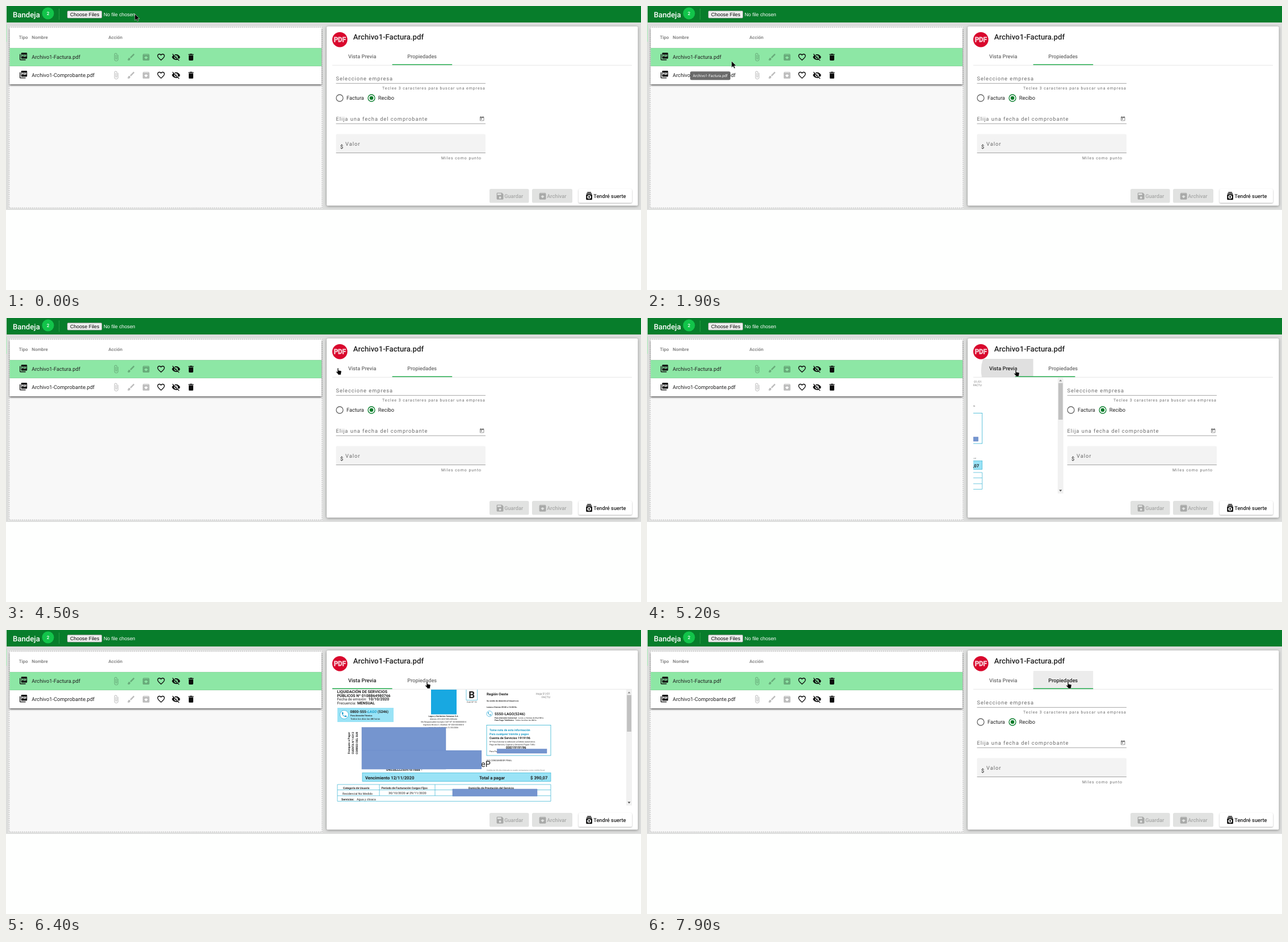
Recreate the animation shown at these times as an HTML page. Size 1119 px wide and 500 px high, loop 8000 ms.

```html
<!DOCTYPE html>
<html lang="es">
<head>
<meta charset="utf-8">
<title>Bandeja</title>
<style>
  html, body { margin: 0; width: 100%; height: 100%; overflow: hidden; background: #fefffe; }
  svg { display: block; width: 100%; height: 100%; }
  text { font-family: Roboto, sans-serif; text-rendering: geometricPrecision; white-space: pre; }
  .native { font-family: "Liberation Sans", Arial, sans-serif; }
  .field text { letter-spacing: .98px; }
  .table { filter: drop-shadow(0 2.2px 1.8px rgba(0,0,0,.65)); }
  .card { filter: drop-shadow(0 1.5px 2px rgba(0,0,0,.4)); }
  .raised { filter: drop-shadow(0 1px 1px rgba(0,0,0,.3)); }
</style>
</head>
<body>
<svg id="stage" viewBox="0 0 1119 500" preserveAspectRatio="xMinYMin meet"></svg>
<script>
const LOOP = 8000, STEP = 100;
const INK = '#212121', MUTED = 'rgba(0,0,0,.54)', OFF = 'rgba(0,0,0,.26)';
const GREEN = '#077d2b', CYAN = '#9ae3f6', MASK = '#7595cf', EDGE = '#35b4d3';

const ICONS = {
  pdf: 'M20 2H8c-1.1 0-2 .9-2 2v12c0 1.1.9 2 2 2h12c1.1 0 2-.9 2-2V4c0-1.1-.9-2-2-2zm-8.5 7.5c0 .83-.67 1.5-1.5 1.5H9v2H7.5V7H10c.83 0 1.5.67 1.5 1.5v1zm5 2c0 .83-.67 1.5-1.5 1.5h-2.5V7H15c.83 0 1.5.67 1.5 1.5v3zm4-3H19v1h1.5V11H19v2h-1.5V7h3v1.5zM9 9.5h1v-1H9v1zM4 6H2v14c0 1.1.9 2 2 2h14v-2H4V6zm10 5.5h1v-3h-1v3z',
  clip: 'M16.5 6v11.5c0 2.2-1.8 4-4 4s-4-1.8-4-4V5c0-1.4 1.1-2.5 2.5-2.5s2.5 1.1 2.5 2.5v10.5c0 .6-.4 1-1 1s-1-.4-1-1V6H10v9.5c0 1.4 1.1 2.5 2.5 2.5s2.5-1.1 2.5-2.5V5c0-2.2-1.8-4-4-4S7 2.8 7 5v12.5c0 3 2.5 5.5 5.5 5.5s5.5-2.5 5.5-5.5V6z',
  brush: 'M7 14c-1.7 0-3 1.3-3 3 0 1.3-1.2 2-2 2 .9 1.2 2.5 2 4 2 2.2 0 4-1.8 4-4 0-1.7-1.3-3-3-3zM20.7 4.6l-1.3-1.3c-.4-.4-1-.4-1.4 0L9 12.25 11.75 15l9-9c.4-.4.4-1 0-1.4z',
  archive: 'M20.5 5.2l-1.4-1.7C18.9 3.2 18.5 3 18 3H6c-.5 0-.9.2-1.2.5L3.5 5.2C3.2 5.6 3 6 3 6.5V19c0 1.1.9 2 2 2h14c1.1 0 2-.9 2-2V6.5c0-.5-.2-.9-.5-1.3zM12 17.5L6.5 12H10v-2h4v2h3.5zM5.1 5l.8-1h12l.9 1z',
  heart: 'M12 21.3L10.5 20C5.4 15.4 2 12.3 2 8.5 2 5.4 4.4 3 7.5 3c1.7 0 3.4.8 4.5 2.1C13.1 3.8 14.8 3 16.5 3 19.6 3 22 5.4 22 8.5c0 3.8-3.4 6.9-8.5 11.5zM12 18.6c4.8-4.3 8-7.2 8-10.1C20 6.5 18.5 5 16.5 5c-1.5 0-3 1-3.6 2.4h-1.8C10.5 6 9 5 7.5 5 5.5 5 4 6.5 4 8.5c0 2.9 3.2 5.8 8 10.1z',
  hidden: 'M12 7c2.76 0 5 2.24 5 5 0 .65-.13 1.26-.36 1.83l2.92 2.92c1.51-1.26 2.7-2.89 3.43-4.75-1.73-4.39-6-7.5-11-7.5-1.4 0-2.74.25-3.98.7l2.16 2.16C10.74 7.13 11.35 7 12 7zM2 4.27l2.74 2.74C3.08 8.3 1.78 10.02 1 12c1.73 4.39 6 7.5 11 7.5 1.55 0 3.03-.3 4.38-.84L19.73 22 21 20.73 3.27 3zM7.53 9.8l1.55 1.55c-.05.21-.08.43-.08.65 0 1.66 1.34 3 3 3 .22 0 .44-.03.65-.08l1.55 1.55c-.67.33-1.41.53-2.2.53-2.76 0-5-2.24-5-5 0-.79.2-1.53.53-2.2zm4.31-.78l3.15 3.15.02-.16c0-1.66-1.34-3-3-3z',
  bin: 'M6 19c0 1.1.9 2 2 2h8c1.1 0 2-.9 2-2V7H6zM19 4h-3.5l-1-1h-5l-1 1H5v2h14z',
  save: 'M17 3H5c-1.1 0-2 .9-2 2v14c0 1.1.9 2 2 2h14c1.1 0 2-.9 2-2V7zM12 19a3 3 0 0 1 0-6 3 3 0 0 1 0 6zM15 9H5V5h10z',
  day: 'M19 3h-1V1h-2v2H8V1H6v2H5c-1.1 0-2 .9-2 2v14c0 1.1.9 2 2 2h14c1.1 0 2-.9 2-2V5c0-1.1-.9-2-2-2zM19 19H5V8h14zM7 10h5v5H7z',
  luck: 'M7 1h10v2H7zM5 4h14v2H5zM6 7h12a2 2 0 0 1 2 2v11a2 2 0 0 1-2 2H6a2 2 0 0 1-2-2V9a2 2 0 0 1 2-2zM12 9.5a5 5 0 0 0 0 10 5 5 0 0 0 0-10zM12 11l-3 3.5h2V18h2v-3.5h2z',
  phone: 'M6.6 10.8c1.4 2.8 3.8 5.1 6.6 6.6l2.2-2.2c.3-.3.7-.4 1-.2 1.1.4 2.3.6 3.6.6.5 0 1 .4 1 1V20c0 .5-.5 1-1 1C10.6 21 3 13.4 3 4c0-.5.5-1 1-1h3.5c.5 0 1 .5 1 1 0 1.3.2 2.5.6 3.6.1.3 0 .7-.3 1z'
};

const text = (x, y, size, str, o = {}) =>
  `<text x="${x}" y="${y}" font-size="${size}" font-weight="${o.w || 400}" fill="${o.c || INK}" ` +
  `text-anchor="${o.a || 'start'}" ${o.x || ''}>${str}</text>`;
const bold = (x, y, size, str, o = {}) => text(x, y, size, str, { w: 700, ...o });
const rect = (x, y, x2, y2, fill, extra = '') =>
  `<rect x="${x}" y="${y}" width="${x2 - x}" height="${y2 - y}" fill="${fill}" ${extra}/>`;
const line = (d, stroke, width = .7, extra = '') =>
  `<path d="${d}" fill="none" stroke="${stroke}" stroke-width="${width}" ${extra}/>`;
const icon = (name, cx, cy, fill, size = 15.84) =>
  `<path d="${ICONS[name]}" fill="${fill}" fill-rule="evenodd" ` +
  `transform="translate(${cx - size / 2} ${cy - size / 2}) scale(${size / 24})"/>`;

function header() {
  return rect(1, 0, 1119, 29, GREEN) +
    text(12, 19.5, 13.2, 'Bandeja', { w: 500, c: '#fff' }) +
    '<circle cx="74" cy="13" r="10.5" fill="#12c44a"/>' +
    text(74, 16, 8, '2', { w: 500, c: '#fff', a: 'middle' }) +
    line('M93.7 5V24', '#45c463', 1, 'stroke-dasharray="1.3 1.3"') +
    rect(108, 8.6, 169, 21.3, '#efefef', 'rx="1.5" stroke="#767676" stroke-width=".6"') +
    text(113, 18.2, 8.8, 'Choose Files', { c: '#000', x: 'class="native"' }) +
    text(172, 18, 8.8, 'No file chosen', { c: '#fff', x: 'class="native"' });
}

function fileRow(y, name) {
  const tools = ['clip', 'brush', 'archive', 'heart', 'hidden', 'bin'];
  return icon('pdf', 30.6, y + 14.8, '#111') + text(45.3, y + 19.2, 9.24, name) +
    tools.map((n, i) => icon(n, 194 + 26.4 * i, y + 16, i < 3 ? OFF : '#0c0c0c')).join('');
}

function filePanel() {
  const head = { w: 500, c: MUTED };
  return rect(4.5, 36, 558, 356.5, '#f8f8f8') +
    rect(5.5, 37.3, 557, 355.5, 'none', 'stroke="#c6c6c6" stroke-width="1.6" stroke-dasharray="2 1.6"') +
    `<g class="table">${rect(6.5, 38.3, 556, 137.7, '#fff')}</g>` +
    rect(6.5, 74, 556, 106, '#8de7a5', 'id="row1"') + rect(6.5, 106, 556, 137.7, '#fff', 'id="row2"') +
    line('M6.5 74H556M6.5 105.8H556', 'rgba(0,0,0,.14)') +
    text(22.8, 58, 7.92, 'Tipo', head) + text(45.3, 58, 7.92, 'Nombre', head) + text(180.6, 58, 7.92, 'Acción', head) +
    fileRow(74, 'Archivo1-Factura.pdf') + fileRow(105.8, 'Archivo1-Comprobante.pdf');
}

function button(x, x2, name, label, on) {
  return `<g class="${on ? 'raised' : ''}">${rect(x, 322, x2, 346.5, on ? '#fff' : '#e1e2e1', 'rx="2.6"')}</g>` +
    icon(name, x + 18.6, 334.7, on ? '#000' : '#a8a9a8') +
    text(x + 26.2, 338, 9.24, label, { w: 500, c: on ? INK : '#a8a9a8' });
}

function form() {
  const label = 'rgba(0,0,0,.58)', rule = 'rgba(0,0,0,.45)';
  const radio = (cx, c) => `<circle cx="${cx}" cy="162" r="6" fill="none" stroke="${c}" stroke-width="1.3"/>`;
  return '<g class="field">' + text(581.5, 131.3, 9.24, 'Seleccione empresa', { c: label }) +
    text(663, 147.2, 6.93, 'Teclee 3 caracteres para buscar una empresa', { c: label }) +
    text(581.5, 201.8, 9.24, 'Elija una fecha del comprobante', { c: label }) +
    rect(581.5, 225.5, 845, 258.8, '#f3f3f3', 'rx="2"') +
    text(589, 250.5, 9.24, '$') + text(598, 246, 9.24, 'Valor', { c: label }) +
    text(767, 269.6, 6.93, 'Miles como punto', { c: label }) + '</g>' +
    line('M581.5 136.3H845M581.5 207.2H845M581.5 258.6H845', rule, .8) +
    icon('day', 838.7, 198.6, MUTED, 9.8) +
    radio(588, 'rgba(0,0,0,.6)') + text(600, 165.3, 9.24, 'Factura') +
    radio(644, GREEN) + `<circle cx="644" cy="162" r="3.3" fill="${GREEN}"/>` + text(655.8, 165.3, 9.24, 'Recibo');
}

function bill() {
  const blue = { c: '#1799c6' }, gray = { c: '#777' }, mid = { a: 'middle' };
  const phone = (x, y, r) => `<circle cx="${x}" cy="${y}" r="${r}" fill="#fff" stroke="#2aa9d6" stroke-width=".7"/>` +
    icon('phone', x, y, '#1c9fd0', r * 1.5);
  const side = (x, s) => text(0, 0, 4.9, s, { w: 700, a: 'middle', x: `transform="translate(${x} 199) rotate(-90)"` });
  const mask = (x, y, x2, y2) => rect(x, y, x2, y2, MASK, 'stroke="#5d7fc0" stroke-width=".5"');
  return bold(583.5, 110.8, 6.9, 'LIQUIDACIÓN DE SERVICIOS') +
    bold(583.5, 117.6, 6.75, 'PÚBLICOS Nº 0108B64980766') +
    text(583.5, 124.3, 6.5, 'Fecha de emisión:') + bold(638.5, 124.3, 6.9, '10/10/2020') +
    text(583.5, 131, 6.5, 'Frecuencia:') + bold(619, 131, 6.7, 'MENSUAL') +
    rect(584, 137, 683, 162, CYAN) + phone(596, 149, 7.5) +
    bold(606.5, 146, 6.4, '0800-555-<tspan fill="#1799c6" font-style="italic">LAGO</tspan> (5246)') +
    bold(607, 152, 3.8, 'Para Atención Técnica') +
    text(607, 158, 4.3, 'Todos los días las <tspan font-weight="700">24</tspan> horas') +
    rect(749, 100, 794, 148.5, '#18a8e1') +
    bold(771, 153.2, 3.6, 'Lagos y Vertientes Serranas S.A.', mid) +
    text(771, 158.2, 3.6, 'Alerces 418 (X2210KLD)Norte', mid) +
    text(771, 163, 3.6, 'IVA Responsable Inscripto CUIT Nº 30-00000000-0', mid) +
    text(771, 168, 3.6, 'Ingresos Brutos C. Multilat. Nº 000-000000-0', mid) +
    text(771, 173, 3.6, 'Inicio de actividades 21/03/2006', mid) +
    line('M811 100V123.5H830.5V100', EDGE) + bold(820.8, 120.2, 17, 'B', mid) +
    text(820.8, 127.8, 3.6, 'Cod. Nº 10', mid) +
    bold(847, 115, 6.3, 'Región Oeste') +
    text(934, 114, 5, 'Hoja 01/01', gray) + text(944, 119.6, 5, 'FACTU', gray) +
    bold(847, 126, 3.5, 'Su centro de Atención al Usuario es:') +
    bold(847, 137, 3.5, 'Lunes a Viernes 09:00 a 16:00 Hs.') +
    phone(852, 147.5, 5) + bold(861, 150.2, 6.5, '5550-LAGO(5246)') +
    bold(861, 155.8, 3.5, 'Para Atención Comercial <tspan font-weight="400">- Lunes a Viernes de</tspan> 8 a 18 <tspan font-weight="400">hs</tspan>') +
    bold(861, 160.4, 3.5, 'Para Pago Telefónico <tspan font-weight="400">- Todos los días las</tspan> 24 <tspan font-weight="400">hs</tspan>') +
    rect(847, 167.5, 960, 221, '#fff', `stroke="${EDGE}" stroke-width=".8"`) +
    bold(852, 178, 5.15, 'Tome nota de esta información', blue) +
    bold(852, 184.6, 5.05, 'Para cualquier trámite y pagos', blue) +
    bold(852, 191.7, 5.45, 'Cuenta de Servicios 1919196') +
    text(852, 198, 3.6, 'Nº Para Solicitar la Adhesión al Débito Automático.') +
    text(852, 203.2, 3.7, 'Pago en Bancos, Cajeros y Servicios Pagos TARJ.') +
    bold(881, 208.6, 6.2, '0001919196') + text(852, 215, 3.7, 'Para Pago') + mask(865.5, 209.5, 953, 217) +
    side(606, 'Franqueo a Pagar') + side(612.8, 'CUENTA N°14313') + side(619.5, 'CORREO DEL SUR') +
    bold(670, 248.2, 6.1, '0403822250978T688 -') + text(837, 241.2, 14.5, 'eP') +
    mask(627, 171.5, 775, 245) + rect(627, 212, 838, 245, MASK) +
    line('M627 212H838V245', '#5d7fc0', .5, 'stroke-dasharray="1 1"') +
    text(847, 230.6, 4, 'IVA CONSUMIDOR FINAL') +
    text(847, 248.2, 3.3, 'Crédito de IVA discriminado no puede computarse como crédito fiscal', gray) +
    rect(628, 251.5, 960, 266.5, CYAN, `stroke="${EDGE}" stroke-width=".7"`) +
    bold(633, 262.7, 7.7, 'Vencimiento 12/11/2020') + bold(834, 262.7, 7.75, 'Total a pagar') + bold(924, 262.7, 7.75, '$ 390,07') +
    line('M584 272H960V301.5H584ZM584 281.5H960M584 291.8H960M658 272V291.8M756 272V291.8', EDGE) +
    bold(594, 279.7, 4.95, 'Categoría de Usuario') + bold(661.5, 279.7, 5, 'Período de Facturación Cargos Fijos') +
    bold(815, 279.7, 4.95, 'Domicilio de Prestación del Servicio') +
    text(593, 289.5, 5.2, 'Residencial No Medido') + text(674, 289, 5.6, '30/10/2020 al 29/11/2020') +
    mask(787, 280, 936, 292.5) + bold(591, 299.6, 5.1, 'Servicios:') + text(618, 299.6, 5.4, 'Agua y cloaca') +
    rect(1093, 105, 1103, 309, '#f1f1f1') + rect(1094.2, 114.5, 1102, 179, '#c1c1c1') +
    '<path d="M1095.5 111.5l2.5-3 2.5 3z" fill="#8a8a8a"/><path d="M1095.5 302.5l2.5 3 2.5-3z" fill="#505050"/>';
}

function detailPanel() {
  const clip = (id, x, y, x2, y2) => `<clipPath id="${id}">${rect(x, y, x2, y2, '#000')}</clipPath>`;
  const tab = (id, x, s) => text(x, 91.6, 9.24, s, { w: 500, a: 'middle', x: `id="${id}"` });
  return clip('body', 575, 105, 1103.3, 309) + clip('clip1', 575, 72, 680.6, 104) + clip('clip2', 680.6, 72, 786.2, 104) +
    `<g class="card">${rect(565, 36, 1113.5, 351.5, '#fff', 'rx="2.6"')}</g><g id="detail">` +
    '<circle cx="588.3" cy="59.2" r="13.3" fill="#d9082d"/>' +
    text(588.3, 63.4, 11.5, 'PDF', { w: 500, c: '#e2506a', a: 'middle', x: 'stroke="#fff" stroke-width=".8"' }) +
    text(611.8, 58.8, 13.2, 'Archivo1-Factura.pdf', { w: 500 }) +
    '<g clip-path="url(#clip1)"><circle id="wave1" cx="650" cy="92"/></g>' +
    '<g clip-path="url(#clip2)"><circle id="wave2" cx="742" cy="92"/></g>' +
    tab('tab1', 627.7, 'Vista Previa') + tab('tab2', 733.2, 'Propiedades') +
    line('M575 104.3H1103', 'rgba(0,0,0,.14)') + rect(575, 102.5, 680.6, 104, '#27ad50', 'id="bar"') +
    `<g clip-path="url(#body)"><g id="pages"><g>${bill()}</g><g transform="translate(528.3 0)">${form()}</g></g></g>` +
    button(852, 921.5, 'save', 'Guardar') + button(927, 998, 'archive', 'Archivar') +
    button(1009, 1103, 'luck', 'Tendré suerte', true) + '</g>';
}

const tooltip = '<g id="tip">' + rect(76, 115.2, 147, 130.2, '#616161', 'rx="2.6" opacity=".93"') +
  text(80.8, 125.2, 6.6, 'Archivo1-Factura.pdf', { c: '#fff' }) + '</g>';
const pointers =
  '<path id="arrow" d="M0 0V11.5L2.7 9 4.6 13 6.4 12.2 4.6 8.3H8.2z" fill="#000" stroke="#fff" stroke-width=".5"/>' +
  '<path id="hand" d="M-.9 .9a.9.9 0 0 1 1.8 0V4.2l4 .9c.9.2 1.3.8 1.1 1.7L5.2 10.6V12H.1V10.8L-3.1 7.3c-.5-.8.4-1.5 1.1-1l1.1.9z" fill="#000" stroke="#fff" stroke-width=".5"/>';

document.getElementById('stage').innerHTML =
  rect(0, 29, 1119, 359, '#dcdddc') + rect(0, 33, 1.5, 63, '#b9ecc4') +
  header() + filePanel() + detailPanel() + tooltip + pointers;

// Pointer steps: time, x, y
const PATH = [
  [0, 227, 14], [600, 230, 28], [700, 231, 45], [900, 229, 52], [1000, 222, 74], [1100, 208, 108],
  [1200, 190, 140], [1300, 176, 147], [1400, 164, 132], [1500, 155, 112], [1600, 150, 100], [1700, 149, 97],
  [3700, 205, 99], [3800, 320, 103], [3900, 450, 104], [4000, 522, 102], [4200, 544, 84], [4400, 556, 84],
  [4500, 585, 88], [4600, 620, 91], [4700, 650, 91], [5700, 656, 92], [5800, 668, 94], [5900, 690, 96],
  [6000, 706, 97], [6100, 717, 97], [6200, 724, 94], [6400, 742, 91]
];
const clamp = v => Math.min(1, Math.max(0, v));

function bezier(x1, y1, x2, y2) {
  const at = (a, b, s) => 3 * (1 - s) * (1 - s) * s * a + 3 * (1 - s) * s * s * b + s ** 3;
  return v => {
    if (v <= 0 || v >= 1) return clamp(v);
    let lo = 0, hi = 1;
    for (let i = 0; i < 24; i++) {
      const m = (lo + hi) / 2;
      if (at(x1, x2, m) < v) lo = m; else hi = m;
    }
    return at(y1, y2, lo);
  };
}
const slide = bezier(.35, 0, .25, 1), spread = bezier(0, 0, .2, 1);

const el = {};
document.querySelectorAll('[id]').forEach(n => el[n.id] = n);
const set = (id, attrs) => { for (const k in attrs) el[id].setAttribute(k, attrs[k]); };
const show = (id, on) => set(id, { display: on ? 'inline' : 'none' });

function wave(id, age, reach) {
  set(id, { r: age < 0 ? 0 : reach * spread(age / 450), opacity: .12 * (1 - clamp((age - 450) / 400)) });
}

function draw(t) {
  const [, x, y] = PATH.findLast(p => p[0] <= t);
  const onTab = x > 575 && y > 72 && y < 104;
  show('arrow', !onTab);
  show('hand', onTab);
  set(onTab ? 'hand' : 'arrow', { transform: `translate(${x} ${y})` });

  const selected = t < 2200 || t >= 3200;
  const overRow2 = x < 556 && y >= 106 && y < 138;
  show('detail', selected);
  set('row1', { fill: selected ? '#8de7a5' : '#f5f5f5' });
  set('row2', { fill: overRow2 ? '#f5f5f5' : '#fff' });

  const tip = clamp((t - 1700) / 150) * (1 - clamp((t - 2150) / 200));
  const k = .9 + .1 * tip;
  set('tip', { opacity: tip, transform: `translate(${111.5 * (1 - k)} ${122.7 * (1 - k)}) scale(${k})` });

  const pos = 1 - slide((t - 5067) / 500) + slide((t - 7383) / 500);
  set('bar', { x: 575 + 105.6 * pos });
  set('pages', { transform: `translate(${-528.3 * pos} 0)` });
  wave('wave1', t - 5000, 77);
  wave('wave2', t - 7300, 64);
  set('tab1', { opacity: t >= 5000 && t < 7300 ? 1 : .65 });
  set('tab2', { opacity: t >= 7300 ? 1 : .65 });
}

const start = performance.now();
function tick() {
  const t = (performance.now() - start) % LOOP;
  draw(Math.floor(t / STEP) * STEP);
  requestAnimationFrame(tick);
}
draw(0);
requestAnimationFrame(tick);
</script>
</body>
</html>
```
